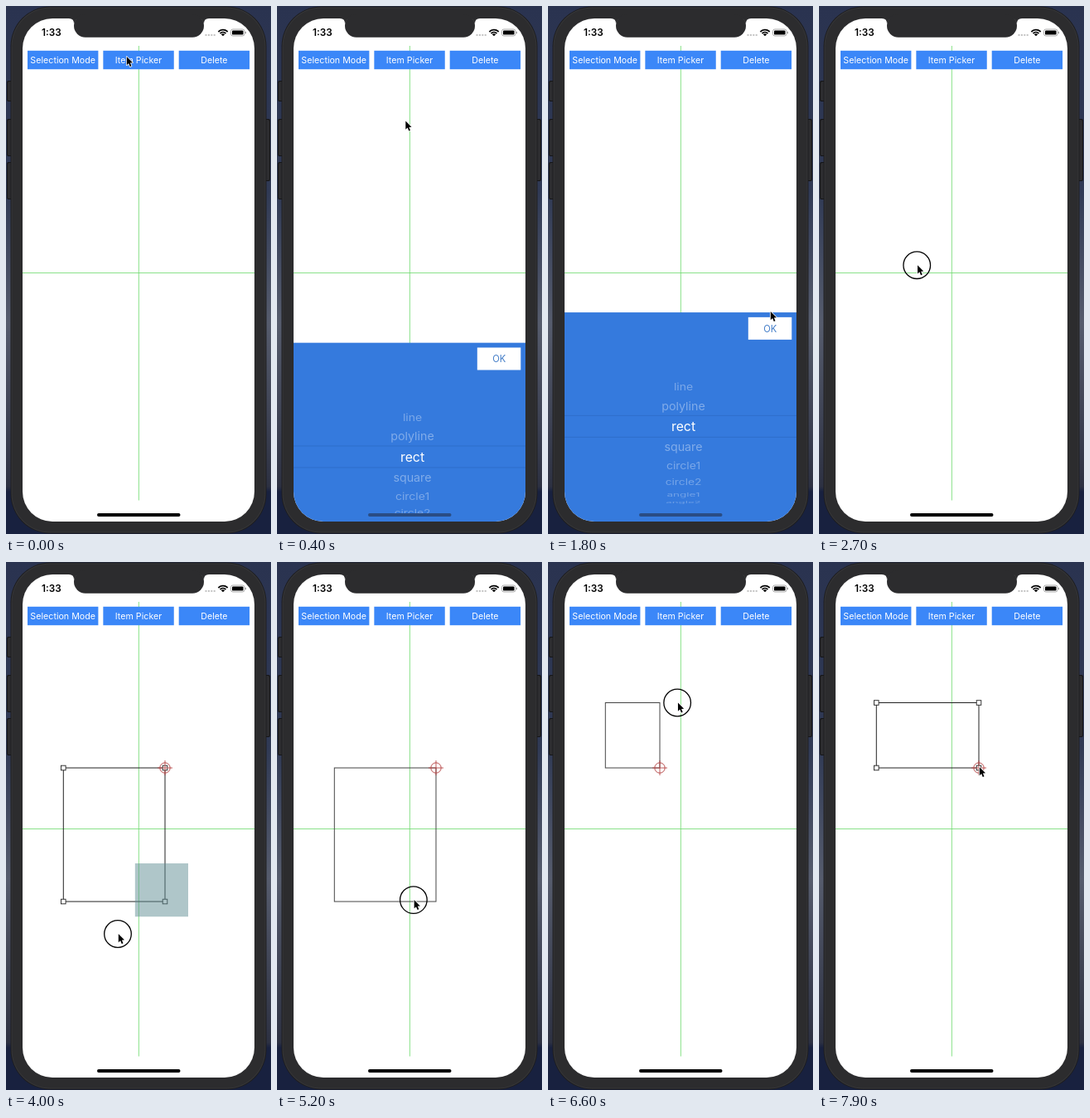
These frames come from a looping animation (320 px wide and 636 px high, 8 s). An HTML page with a canvas:

```html
<!DOCTYPE html>
<html lang="en">
<head>
<meta charset="utf-8">
<title>Shape editor</title>
<style>
html, body { margin: 0; width: 100%; height: 100%; overflow: hidden; background: #1f2740; }
canvas { display: block; width: 320px; height: 636px; }
</style>
</head>
<body>
<canvas id="stage"></canvas>
<script>
const W = 320, H = 636, LOOP = 8000, LAG = 120, TAP = 110;
const BLUE = '#3b87f8', PANEL = '#357add', BEZEL = '#2c2c2e', GREEN = '#6cda6c';
const SCREEN = { x: 20, y: 15, w: 280, h: 606 };
const canvas = document.getElementById('stage');
const ratio = window.devicePixelRatio || 1;
canvas.width = W * ratio;
canvas.height = H * ratio;
const c = canvas.getContext('2d');

const at = (x, y) => ({ x, y });
const itemButton = at(145, 61), modeButton = at(68, 68), okButton = at(268, 368);
const origin = at(69.3, 248), corner = at(192, 409), pickFrom = at(220, 363);

// Pointer moves: start, end, destination
const moves = [
  [250, 760, at(190, 428)],
  [1250, 1600, okButton],
  [1900, 2400, origin],
  [2580, 2860, corner],
  [2960, 3200, modeButton],
  [3330, 3590, pickFrom],
  [3631, 4000, at(135, 448)],
  [4200, 4520, modeButton],
  [4700, 5000, corner],
  [5080, 5330, at(135, 405)],
  [5400, 6200, at(135, 169.5)],
  [6480, 6776, at(193, 169.5)],
  [7100, 7500, at(193, 247)]
];
const taps = { open: 130, ok: 1680, pick: 3210, edit: 4550 };
const drags = {
  draw: { from: 2560, to: 2930 },
  pick: { from: 3620, to: 4150 },
  bend: { from: 5060, to: 6950 }
};
const items = ['line', 'polyline', 'rect', 'square', 'circle1', 'circle2', 'angle1', 'angle2'];

const limit = (v, lo, hi) => Math.max(lo, Math.min(hi, v));
const smooth = v => { const u = limit(v, 0, 1); return u * u * (3 - 2 * u); };
const easeOut = v => 1 - Math.pow(1 - limit(v, 0, 1), 3);
const tapped = (t, start) => t >= start && t < start + TAP;
const during = (t, d) => t >= d.from && t < d.to;

function pointer(t) {
  return moves.reduce((p, [t0, t1, to]) => {
    const u = smooth((t - t0) / (t1 - t0));
    return at(p.x + (to.x - p.x) * u, p.y + (to.y - p.y) * u);
  }, itemButton);
}

// Position of a drag as the app sees it, a little late
const dragged = (t, d) => pointer(limit(t - LAG, d.from, d.to));

function box(x, y, w, h, fill) {
  c.fillStyle = fill;
  c.fillRect(x, y, w, h);
}

function frame(x, y, w, h, color, width = 1) {
  c.strokeStyle = color;
  c.lineWidth = width;
  c.strokeRect(x, y, w, h);
}

function round(x, y, w, h, r, fill) {
  c.beginPath();
  c.roundRect(x, y, w, h, r);
  c.fillStyle = fill;
  c.fill();
}

function line(x1, y1, x2, y2, color, width = 1) {
  c.beginPath();
  c.moveTo(x1, y1);
  c.lineTo(x2, y2);
  c.strokeStyle = color;
  c.lineWidth = width;
  c.stroke();
}

function ring(x, y, r, color, width, from = 0, to = 7) {
  c.beginPath();
  c.arc(x, y, r, from, to);
  c.strokeStyle = color;
  c.lineWidth = width;
  c.stroke();
}

function text(s, x, y, size, color, weight = 400) {
  c.font = `${weight} ${size}px Inter, "Liberation Sans", sans-serif`;
  c.textAlign = 'center';
  c.fillStyle = color;
  c.fillText(s, x, y + size * 0.364);
}

function wallpaper() {
  const g = c.createLinearGradient(0, 0, 0, H);
  g.addColorStop(0, '#2a3350');
  g.addColorStop(0.35, '#303a55');
  g.addColorStop(0.6, '#565c6d');
  g.addColorStop(0.91, '#2d3142');
  g.addColorStop(0.92, '#18213f');
  box(0, 0, W, H, g);
}

function sideKey(x, y, h) {
  round(x, y, 8, h, 2, '#151517');
  round(x + 1, y + 1, 6, h - 2, 1.5, '#2d2d30');
}

function phone() {
  sideKey(1, 90, 25);
  sideKey(1, 136, 45);
  sideKey(1, 188, 45);
  sideKey(311, 136, 75);
  ['#1d1d1f', '#363638', BEZEL].forEach((fill, i) =>
    round(5.5 + i, 0.5 + i, 309 - 2 * i, 635 - 2 * i, 48 - i, fill));
}

function notch() {
  round(82, 10, 157, 27.7, 16, BEZEL);
  [[82, -1], [239, 1]].forEach(([x, side]) => {
    c.beginPath();
    c.moveTo(x + 6 * side, 14);
    c.lineTo(x + 6 * side, 15);
    c.quadraticCurveTo(x, 15, x, 21);
    c.lineTo(x - 4 * side, 14);
    c.fill();
  });
}

function status() {
  text('1:33', 55, 32, 11.8, '#000', 600);
  for (let i = 0; i < 4; i++) box(240.5 + i * 3.4, 34, 2, 2, '#c4c4c4');
  for (const r of [1.5, 4.7, 7.7]) {
    ring(262, 36.3, r, '#000', r < 2 ? 3 : 1.8, -Math.PI * 0.76, -Math.PI * 0.24);
  }
  c.beginPath();
  c.roundRect(271.5, 28, 16.5, 8, 2.4);
  c.strokeStyle = '#999';
  c.lineWidth = 0.8;
  c.stroke();
  round(273, 29.4, 13.5, 5.2, 1.2, '#000');
  round(288.9, 30.7, 1.1, 2.6, 0.5, '#999');
}

function axes() {
  line(160.4, 48, 160.4, 595.5, GREEN, 0.8);
  line(SCREEN.x, 321.5, SCREEN.x + SCREEN.w, 321.5, GREEN, 0.8);
}

function buttons(t) {
  const hot = [tapped(t, taps.pick) || tapped(t, taps.edit), tapped(t, taps.open)];
  ['Selection Mode', 'Item Picker', 'Delete'].forEach((s, i) => {
    const x = 26 + i * 91.35;
    box(x, 53.8, 85.4, 22.4, BLUE);
    text(s, x + 42.7, 65, 10.7, hot[i] ? 'rgba(255,255,255,.4)' : '#fff');
  });
}

function target(x, y) {
  const red = '#b84a4a';
  ring(x, y, 6.2, red, 1);
  line(x - 9, y, x + 9, y, red, 0.9);
  line(x, y - 9, x, y + 9, red, 0.9);
}

function shape(t) {
  const { draw, pick, bend } = drags;
  const { x, y } = dragged(t, t < bend.from ? draw : bend);
  if (x - origin.x < 2) return;
  const selected = t > pick.from + 2 * LAG;
  const bending = t > bend.from + LAG && t < bend.to;
  frame(origin.x, origin.y, x - origin.x, y - origin.y, bending ? '#444' : '#222');
  if (!selected) return;
  if (!bending) {
    for (const hx of [origin.x, x]) for (const hy of [origin.y, y]) {
      box(hx - 2.8, hy - 2.8, 5.6, 5.6, '#fff');
      frame(hx - 2.8, hy - 2.8, 5.6, 5.6, '#222', 0.9);
    }
  }
  target(x, origin.y);
}

function marquee(t) {
  if (!during(t, drags.pick)) return;
  const p = dragged(t, drags.pick);
  box(p.x, pickFrom.y, pickFrom.x - p.x, p.y - pickFrom.y, 'rgba(96,141,147,.5)');
}

function picker(t) {
  const opened = easeOut((t - taps.open - TAP) / 400);
  const closed = easeOut((t - taps.ok - TAP) / 400);
  const up = opened - closed;
  c.save();
  c.translate(0, 347 + (1 - up) * 275);
  box(SCREEN.x, 0, SCREEN.w, 275, PANEL);
  box(241.8, 5.8, 52.5, 27, '#fff');
  text('OK', 268.2, 19.5, 11.2, tapped(t, taps.ok) ? '#b9d3f6' : '#447ec8');
  for (const y of [124.3, 150.3]) line(20, y, 300, y, 'rgba(20,60,130,.3)', 0.7);
  // Rows lie on a turning drum
  items.forEach((s, i) => {
    const k = i - 2, a = k * Math.PI / 12, d = Math.abs(k);
    c.save();
    c.translate(163.5, 137.3 + 95 * Math.sin(a));
    c.scale(1, Math.cos(a));
    text(s, 0, 0, k ? 14.5 - d * 0.25 : 15.8,
      k ? `rgba(255,255,255,${0.4 - d * 0.025})` : '#fff');
    c.restore();
  });
  c.restore();
  round(110, 611, 100.5, 3.9, 2, up > 0.1 ? '#2a4d84' : '#000');
}

function arrow(x, y) {
  c.save();
  c.translate(x, y);
  c.beginPath();
  [[0, 0], [0, 10.2], [2.3, 8.1], [4, 12], [5.7, 11.2], [4.1, 7.5], [7.2, 7.3]]
    .forEach(p => c.lineTo(...p));
  c.closePath();
  c.lineJoin = 'round';
  c.strokeStyle = '#fff';
  c.lineWidth = 1.6;
  c.stroke();
  c.fillStyle = '#000';
  c.fill();
  c.restore();
}

function touch(t) {
  const p = pointer(t);
  const down = Object.values(taps).some(s => tapped(t, s)) ||
    Object.values(drags).some(d => during(t, d));
  if (down) ring(p.x, p.y, 16.3, '#000', 1.3);
  arrow(p.x + 0.8, p.y);
}

function draw(t) {
  c.setTransform(ratio, 0, 0, ratio, 0, 0);
  wallpaper();
  phone();
  c.save();
  round(SCREEN.x, SCREEN.y, SCREEN.w, SCREEN.h, 36, '#fff');
  c.clip();
  axes();
  shape(t);
  marquee(t);
  buttons(t);
  picker(t);
  c.restore();
  notch();
  status();
  touch(t);
}

function tick() {
  draw(performance.now() % LOOP);
  requestAnimationFrame(tick);
}
tick();
</script>
</body>
</html>
```
